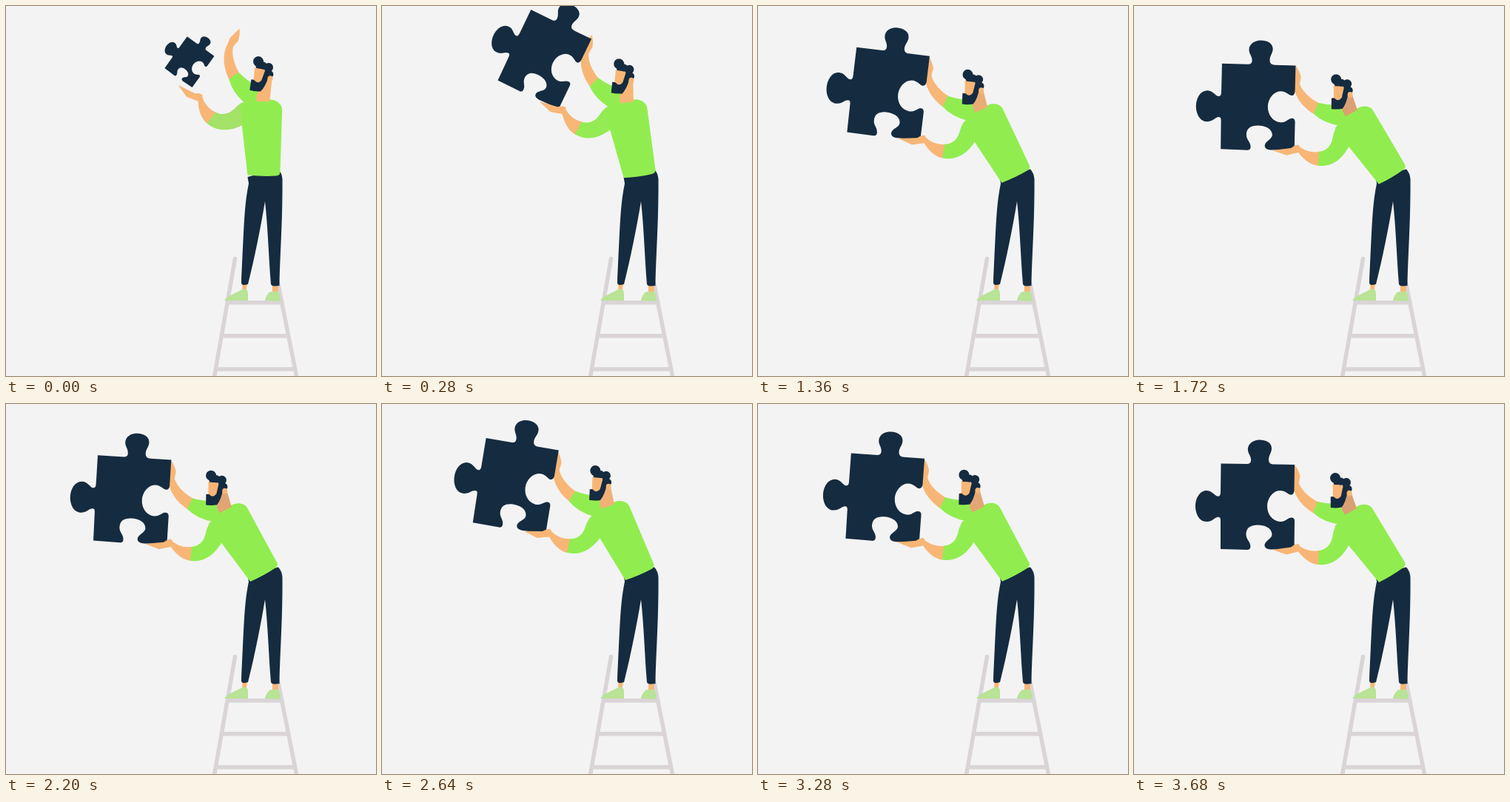
Recreate the animation shown at these times as an HTML page with a canvas. Size 500 by 500 pixels, loop 3.72 s.

```html
<!DOCTYPE html>
<html lang="en">
<head>
<meta charset="utf-8">
<title>Puzzle on a ladder</title>
<style>
html, body { margin: 0; width: 100%; height: 100%; overflow: hidden; background: #f3f3f3; }
canvas { display: block; width: 500px; height: 500px; }
</style>
</head>
<body>
<canvas id="stage" width="500" height="500"></canvas>
<script>
const ctx = document.getElementById('stage').getContext('2d');
const LOOP = 3720, STEP = 40;
const NAVY = '#152b40', GREEN = '#91ed4f', SKIN = '#f8b676', SHOE = '#b9e395', RAIL = '#dad4d6';
const HIP = { x: 348, y: 229 };

// Lean of the upper body in degrees, eased between [time, angle] stops.
const LEAN = [[0, 35], [620, 11.2], [920, 11.1], [1865, 0], [2780, 9.2], [3640, 0], [3720, 0]];

const shape = {
  ladder: new Path2D('M309.5 341.5L280 510M367 372L394.5 510M300 400.8H373M292 445.8H381M285 490.8H390'),
  legs: new Path2D(`M326.5 231L328 240C322 270 322 290 318 374Q318 377 322 377L327 376
    C336 340 344 300 350 264C354 300 355 340 358 376Q359 378.5 363 378.5L369.5 378
    C370 340 374 290 373.5 234Q373 226 368 220.5Z`),
  ankles: new Path2D('M319.5 376H326L324 387H319ZM360 378H367.5L368 388H360Z'),
  shoes: new Path2D(`M295 398C300 391 311 388 319 383Q326 381 327 387V398Z
    M350 398C352 389 357 385 361 386Q368 384 370 390L371 399Z`),
  torso: new Path2D(`M301 139C306 135 317 134 322 141L366 214Q368 218 364 221
    Q349 232 331 241L290 191L271 166Q276 160 282 152Z`),
  frontSleeve: new Path2D(`M249 217L250 198C259 197 266 191 268 180Q270 165 278 160L300 175
    L290 191C281 208 267 219 249 217Z`),
  frontArm: new Path2D(`M251 198C240 200 231 197 224 192L222 189L217 190L212 193.5L187 197
    L206 203.5L222 199.5C231 211 241 217 250 217Z`),
  backSleeve: new Path2D('M248 132Q264 136 282 134L296 142L280 163Q256 160 242 147Z'),
  backArm: new Path2D(`M249 132.5C236 126 226 116 223 107L224.5 97Q222 88 217 82L213 99
    L215 110C217 127 230 140 243 147.5Z`),
  piece: new Path2D(`M117.5 80.5L153 81Q159 81 158 74C157 68 153 66 154 59
    C156 51 164 48.5 170 48.5C178 48.5 186 52 186 60C186 66 182 69 182 75
    C182 80 185 81.5 189 81.5L217 82L216.5 117C216 123 212 124 208 121
    C204 118 200 116.5 196 117C187 118 180 128 180 138C180 149 187 158 197 159
    C203 159.5 206 156 210 154C214 152.5 217 154 217 158L216.5 196L186 196.5
    C181 196.5 176 195 176.5 190C178 184 186.5 182 186.5 176C186 167 176 163.5 167 163.5
    C158 163.5 151 167 151.5 177C152 183 156 185 157 190C158 194 157 197 153 197L117 196
    V157C117 152 114 152 110 154C106 157 103 159 98 159C88 159 83 148 83 138
    C83 127 89 117 98 117C104 117 107 121 111 124C115 126 117 124 117 119Z`),
  face: new Path2D('M-4 8H10L9 23L2 31L-5 26Z'),
  hair: new Path2D(`M7 0A7 7 0 1 1 -7 0A7 7 0 1 1 7 0M12 5A5 5 0 1 1 2 5A5 5 0 1 1 12 5
    M20.5 7A6 6 0 1 1 8.5 7A6 6 0 1 1 20.5 7M21.5 16A5 5 0 1 1 11.5 16A5 5 0 1 1 21.5 16`),
  sideburn: new Path2D('M-4 4L12 2L20 16L14 22L9 10L-2 9Z'),
  beard: new Path2D('M-8 25Q-4 24 -2 27Q2 30 6 25L10 11L15 20Q12 33 6 40Q-2 41 -9 39.5Z')
};

const ease = p => (1 - Math.cos(Math.PI * Math.min(1, Math.max(0, p)))) / 2;
const mix = (a, b, p) => a + (b - a) * p;
const rad = deg => deg * Math.PI / 180;
const mixColor = (a, b, p) => `rgb(${a.map((v, i) => Math.round(mix(v, b[i], p)))})`;

function leanAt(t) {
  const i = LEAN.findIndex(([time]) => time > t);
  const [t0, a] = LEAN[i - 1], [t1, b] = LEAN[i];
  return mix(a, b, ease((t - t0) / (t1 - t0)));
}

function fill(path, color) {
  ctx.fillStyle = color;
  ctx.fill(path);
}

// Rotates about the hip; reach pushes the parts outwards along the arms.
function aboutHip(deg, reach, draw) {
  ctx.save();
  ctx.translate(HIP.x, HIP.y);
  ctx.rotate(rad(deg));
  ctx.translate(-HIP.x - 0.895 * reach, -HIP.y - 0.447 * reach);
  draw();
  ctx.restore();
}

function turn(x, y, deg) {
  const c = Math.cos(rad(deg)), s = Math.sin(rad(deg));
  return [x * c - y * s, x * s + y * c];
}

function drawNeck(head, tilt, torsoLean, color) {
  const onHead = (x, y) => turn(x, y, tilt).map((v, i) => v + head[i]);
  const onTorso = (x, y) => turn(x - HIP.x, y - HIP.y, torsoLean)
    .map((v, i) => v + (i ? HIP.y : HIP.x));
  const points = [onHead(14, 18), onHead(20, 21), onTorso(301, 141),
    onTorso(285, 150), onTorso(281, 143), onHead(6, 32)];
  ctx.beginPath();
  points.forEach(p => ctx.lineTo(...p));
  ctx.fillStyle = color;
  ctx.fill();
}

function drawHead([x, y], tilt) {
  ctx.save();
  ctx.translate(x, y);
  ctx.rotate(rad(tilt));
  fill(shape.face, SKIN);
  fill(shape.hair, NAVY);
  fill(shape.sideburn, NAVY);
  fill(shape.beard, NAVY);
  ctx.beginPath();
  ctx.ellipse(17.5, 22, 3.5, 4, 0, 0, 7);
  ctx.fillStyle = SKIN;
  ctx.fill();
  ctx.restore();
}

function drawPiece(scale) {
  ctx.save();
  ctx.translate(195, 183);
  ctx.scale(scale, scale);
  ctx.translate(-195, -183);
  fill(shape.piece, NAVY);
  ctx.restore();
}

function draw(t) {
  const lean = leanAt(t), torsoLean = lean * 0.94;
  const reach = 4.8 * (1 - Math.exp(-lean / 13));
  const grow = ease(t / 380);
  const head = [272 + 1.85 * lean + 0.0035 * lean ** 2, 100 - 1.28 * lean + 0.0162 * lean ** 2];
  const tilt = Math.max(-4, (lean - 11.5) * (lean > 11.5 ? 0.17 : 0.35));

  ctx.fillStyle = '#f3f3f3';
  ctx.fillRect(0, 0, 500, 500);
  ctx.strokeStyle = RAIL;
  ctx.lineWidth = 5.5;
  ctx.lineCap = 'round';
  ctx.stroke(shape.ladder);
  fill(shape.ankles, SKIN);
  fill(shape.shoes, SHOE);
  fill(shape.legs, NAVY);

  aboutHip(torsoLean, reach, () => {
    fill(shape.backArm, SKIN);
    fill(shape.backSleeve, GREEN);
  });
  aboutHip(lean, reach, () => {
    drawPiece(mix(0.455, 1, grow));
    fill(shape.frontArm, SKIN);
    fill(shape.frontSleeve, mixColor([164, 226, 104], [145, 237, 79], grow));
  });
  aboutHip(torsoLean, reach * 0.35, () => fill(shape.torso, GREEN));

  const neck = mixColor([217, 160, 116], [248, 182, 118], Math.min(1, lean / 11));
  drawNeck(head, tilt, torsoLean, neck);
  drawHead(head, tilt);
}

const start = performance.now();
function tick() {
  const t = (performance.now() - start) % LOOP;
  draw(Math.floor(t / STEP) * STEP);
  requestAnimationFrame(tick);
}
tick();
</script>
</body>
</html>
```
